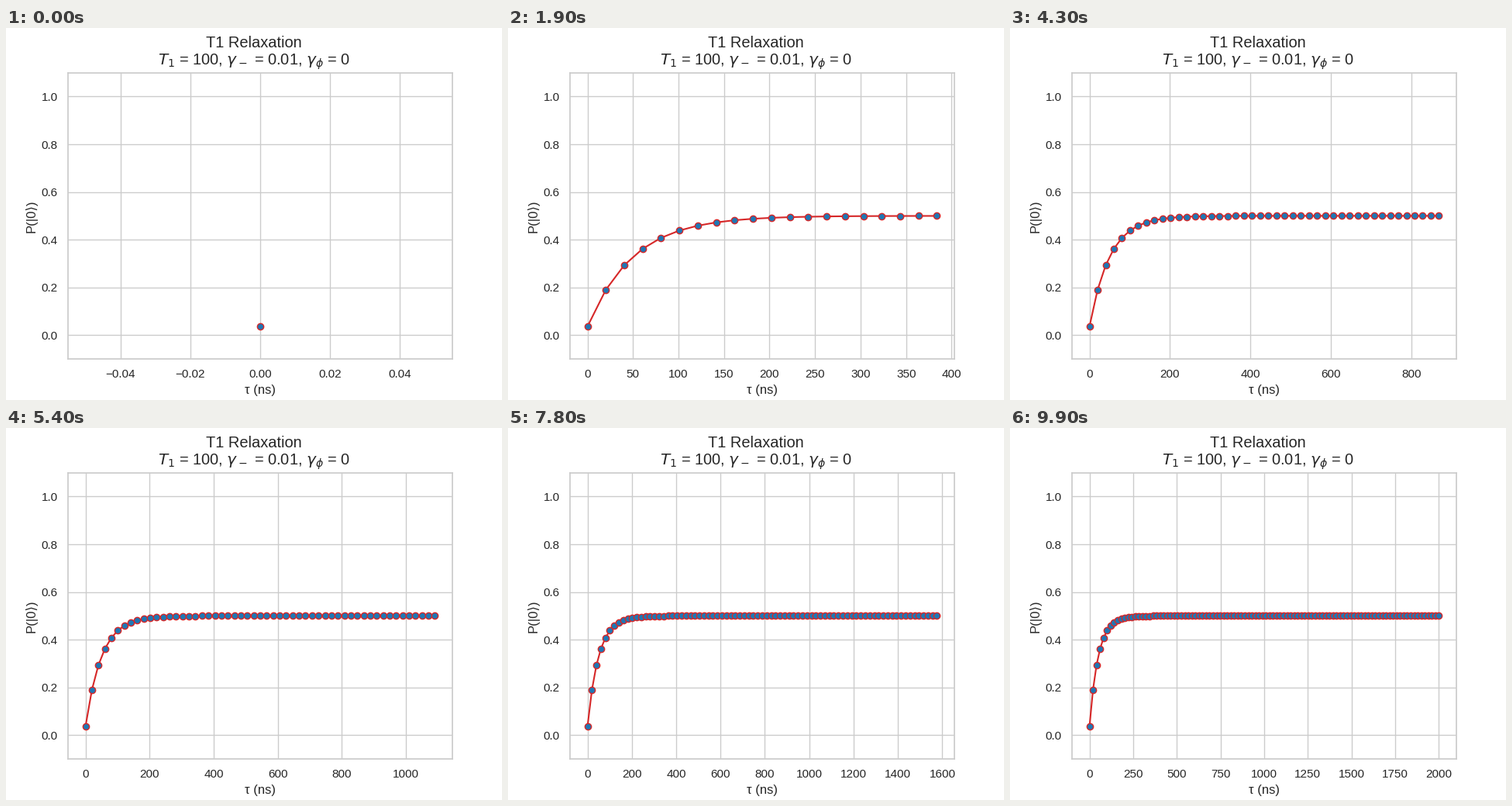
Animation, 640 px wide and 480 px high, one loop 10000 ms. Source, as a matplotlib script:

```python
import matplotlib.pyplot as plt
import numpy as np
from matplotlib.animation import FuncAnimation

FRAMES = 100
INTERVAL = 100
GAMMA = 0.01

plt.rcParams.update({
    "figure.dpi": 100,
    "font.family": ["Liberation Sans", "DejaVu Sans"],
    "font.size": 12,
    "text.color": ".15",
    "axes.labelcolor": ".15",
    "axes.labelsize": 12,
    "axes.edgecolor": ".8",
    "axes.linewidth": 1.25,
    "axes.axisbelow": True,
    "axes.grid": True,
    "grid.color": ".8",
    "grid.linewidth": 1,
    "lines.solid_capstyle": "round",
})
for axis, side in (("xtick", "bottom"), ("ytick", "left")):
    plt.rcParams.update({
        f"{axis}.{side}": False,
        f"{axis}.color": ".15",
        f"{axis}.labelsize": 11,
        f"{axis}.major.size": 6,
    })

tau = np.linspace(0, 2000, FRAMES)
prob = 0.5 - 0.4635 * np.exp(-2 * GAMMA * tau)

fig, ax = plt.subplots(figsize=(6.4, 4.8))
fig.suptitle("T1 Relaxation\n"
             r"$T_1$ = 100, $\gamma_-$ = 0.01, $\gamma_\phi$ = 0")
ax.set_xlabel("τ (ns)")
ax.set_ylabel("P(|0⟩)")
ax.set_ylim(-0.1, 1.1)
curve, = ax.plot([], [], color="tab:red", lw=1.5, marker="o", ms=6,
                 mfc="tab:blue", mec="tab:red", mew=1)


def update(i):
    """Show the first i + 1 points and fit the time axis to them."""
    curve.set_data(tau[:i + 1], prob[:i + 1])
    margin = 0.05 * tau[i] if i else 0.055
    ax.set_xlim(-margin, tau[i] + margin)
    return curve,


anim = FuncAnimation(fig, update, frames=FRAMES, interval=INTERVAL,
                     repeat=True, repeat_delay=0)
plt.show()
```
